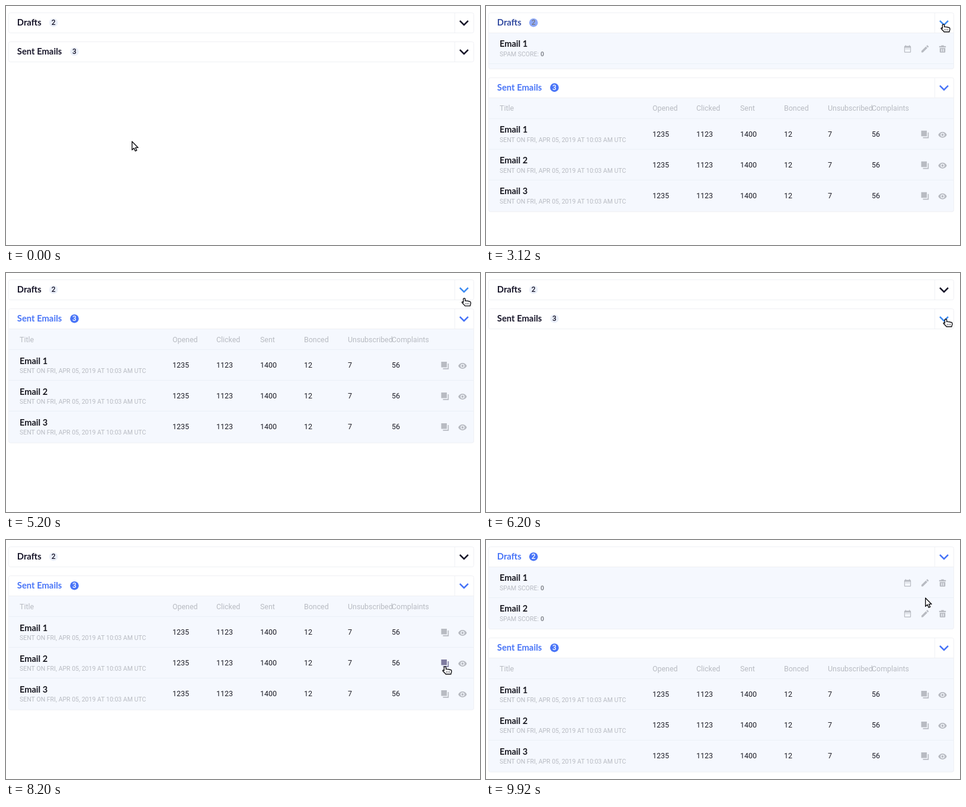
Recreate the animation shown at these times as an HTML page with a canvas. Size 800 by 404 pixels, loop 10000 ms.

```html
<!DOCTYPE html>
<html lang="en">
<head>
<meta charset="utf-8">
<title>Email lists</title>
<style>
html, body { margin: 0; width: 100%; height: 100%; overflow: hidden; background: #fff; }
canvas { display: block; width: 800px; height: 404px; }
</style>
</head>
<body>
<canvas id="stage"></canvas>
<script>
const W = 800, H = 404, LOOP = 10000, SLIDE = 520;
const canvas = document.getElementById('stage');
const ctx = canvas.getContext('2d');
const ratio = window.devicePixelRatio || 1;
canvas.width = W * ratio;
canvas.height = H * ratio;

const DARK = [24, 22, 42], BLUE = [72, 116, 247], HOVER = [62, 140, 242];
const PALE = [234, 239, 249], WHITE = [255, 255, 255];
const GREY = [184, 187, 194], PLUM = [70, 60, 125];
const LINE = '#eff0f4', ROW_LINE = '#ebf0f7', BODY = '#f5f8fe', MUTED = '#b8bbc2';
const HEAD = 'Lato, "Open Sans", sans-serif';
const TEXT = 'Roboto, "Open Sans", sans-serif';

// Times of change and the value reached; values hold in between.
const TRACKS = {
  drafts: [[2990, 1], [4390, 0], [8910, 1]],
  sent: [[910, 1], [5670, 0], [6710, 1]],
  draftsHover: [[2300, 1], [5380, 0], [8910, 1], [9500, 0]],
  sentHover: [[910, 1], [1620, 0], [5560, 1], [7330, 0]],
  copyHover: [[8060, 1], [8340, 0]]
};

const CURSOR = [
  [80, 212, 228], [330, 600, 130], [500, 780, 58], [570, 789, 50], [680, 776, 77],
  [1440, 776, 77], [1700, 774, 64], [1880, 772, 51], [1920, 772, 40], [2000, 772, 33], [2080, 772, 30],
  [4920, 772, 30], [5300, 774, 46], [5640, 776, 77],
  [7230, 776, 77], [7720, 770, 165], [8020, 746, 211], [8200, 741, 213], [8360, 743, 206], [8720, 773, 29],
  [9440, 773, 29], [9640, 758, 62], [9920, 741, 97]
];

const EYE = new Path2D('M12 4.5C7 4.5 2.73 7.61 1 12c1.73 4.39 6 7.5 11 7.5s9.27-3.11 11-7.5c-1.73-4.39-6-7.5-11-7.5zM12 17a5 5 0 1 1 0-10a5 5 0 0 1 0 10zM12 9a3 3 0 1 0 0 6a3 3 0 0 0 0-6z');
const PENCIL = new Path2D('M3 17.25V21h3.75L17.81 9.94l-3.75-3.75zM20.71 7.04a1 1 0 0 0 0-1.41l-2.34-2.34a1 1 0 0 0-1.41 0l-1.83 1.83 3.75 3.75z');
const CALENDAR = new Path2D('M19 4h-1V2h-2v2H8V2H6v2H5a2 2 0 0 0-2 2v14a2 2 0 0 0 2 2h14a2 2 0 0 0 2-2V6a2 2 0 0 0-2-2zM19 20H5V9h14zM7 11h2v2H7zM11 11h2v2h-2zM15 11h2v2h-2z');
const TRASH = new Path2D('M8.5 2.5h7v2H21V8H3V4.5h5.5zM4.5 9.5h15V20a2 2 0 0 1-2 2h-11a2 2 0 0 1-2-2zM8.5 12v7.5h2V12zM13.5 12v7.5h2V12z');
const ARROW = new Path2D('M.7 .9V15.3L4 12.3L6.2 17.1L8.7 16L6.5 11.4H11z');
const HAND = new Path2D('M-1.6 8.6V2.3Q-1.6 1 0 1T1.6 2.3V5.4Q3 4.8 4.6 5.6Q6.4 5.1 7.8 6.3Q10.8 6 10.9 8.4V10.2Q10.2 11.8 9.9 13.8H1Q.4 12.3-1.4 10.9L-3.6 8.6Q-4.4 7.3-3.1 6.9Q-2.3 6.8-1.6 7.8');

const clamp = v => Math.max(0, Math.min(1, v));
const easeOut = v => 1 - Math.pow(1 - clamp(v), 3);
const mix = (a, b, k) => a.map((v, i) => v + (b[i] - v) * k);
const rgb = c => `rgb(${c.map(Math.round).join(',')})`;

function track(name, t, length, ease) {
  let value = 0;
  for (const [start, goal] of TRACKS[name]) {
    if (t < start) break;
    value += (goal - value) * ease((t - start) / length);
  }
  return value;
}

function cursorAt(t) {
  let prev = CURSOR[0];
  for (const next of CURSOR) {
    if (t < next[0]) {
      const k = clamp((t - prev[0]) / (next[0] - prev[0] || 1));
      return [prev[1] + (next[1] - prev[1]) * k, prev[2] + (next[2] - prev[2]) * k];
    }
    prev = next;
  }
  return [prev[1], prev[2]];
}

function label(text, x, y, font, color, align = 'left') {
  ctx.font = font;
  ctx.fillStyle = color;
  ctx.textAlign = align;
  ctx.fillText(text, x, y);
}

function line(x1, y1, x2, y2, color) {
  ctx.strokeStyle = color;
  ctx.lineWidth = 1;
  ctx.beginPath();
  ctx.moveTo(x1, y1);
  ctx.lineTo(x2, y2);
  ctx.stroke();
}

function icon(path, cx, cy, scale) {
  ctx.save();
  ctx.translate(cx - 12 * scale, cy - 12 * scale);
  ctx.scale(scale, scale);
  ctx.fillStyle = rgb(GREY);
  ctx.fill(path, 'evenodd');
  ctx.restore();
}

function copyIcon(x, y, color) {
  ctx.fillStyle = color;
  ctx.fillRect(x - 6.5, y - 6.5, 9.5, 9.5);
  ctx.strokeStyle = color;
  ctx.lineWidth = 1.7;
  ctx.beginPath();
  ctx.moveTo(x + 5.4, y - 3.5);
  ctx.lineTo(x + 5.4, y + 5.4);
  ctx.lineTo(x - 3.5, y + 5.4);
  ctx.stroke();
}

function chevron(y, color) {
  ctx.strokeStyle = color;
  ctx.lineWidth = 2.5;
  ctx.beginPath();
  ctx.moveTo(766, y - 3.6);
  ctx.lineTo(773, y + 3.4);
  ctx.lineTo(780, y - 3.6);
  ctx.stroke();
}

function card(top, bodyHeight, open, hover, title, count, badgeX, drawBody) {
  const mid = top + 17;
  ctx.save();
  ctx.beginPath();
  ctx.roundRect(4.5, top, 785, 35 + bodyHeight, 3);
  ctx.clip();
  ctx.fillStyle = '#fff';
  ctx.fillRect(4, top, 786, 35);
  if (bodyHeight > 0.2) {
    ctx.fillStyle = BODY;
    ctx.fillRect(4, top + 34.5, 786, bodyHeight + 1);
    drawBody(top + 34);
    line(5, top + 34.5, 789, top + 34.5, LINE);
  }
  ctx.restore();

  ctx.strokeStyle = LINE;
  ctx.lineWidth = 1;
  ctx.beginPath();
  ctx.roundRect(4.5, top + 0.5, 785, 34 + bodyHeight, 3);
  ctx.stroke();
  line(757.5, top + 1, 757.5, top + 34, LINE);

  const ink = mix(DARK, BLUE, open);
  label(title, 18.8, mid + 5, `bold 14.8px ${HEAD}`, rgb(ink));
  ctx.fillStyle = rgb(mix(PALE, BLUE, open));
  ctx.beginPath();
  ctx.arc(badgeX, mid + 0.2, 7.3, 0, Math.PI * 2);
  ctx.fill();
  const digit = mix(DARK, WHITE, Math.pow(open, 1.6));
  label(count, badgeX, mid + 4.4, `500 12px ${TEXT}`, rgb(digit), 'center');
  chevron(mid + 0.6, rgb(mix(ink, HOVER, hover)));
}

function draftRows(y) {
  for (let i = 0; i < 2; i++) {
    const top = y + i * 52;
    label('Email ' + (i + 1), 23, top + 24, `bold 14.6px ${HEAD}`, '#17171f');
    label('SPAM SCORE: ', 23, top + 40, `10.5px ${TEXT}`, MUTED);
    label('0', 92, top + 40, `bold 10.5px ${TEXT}`, '#85888f');
    icon(CALENDAR, 711.5, top + 27.5, 0.63);
    icon(PENCIL, 741, top + 27.5, 0.68);
    icon(TRASH, 770.5, top + 27.5, 0.63);
    if (i < 1) line(5, top + 52.5, 789, top + 52.5, ROW_LINE);
  }
}

function sentRows(y, copyHover) {
  const heads = ['Opened', 'Clicked', 'Sent', 'Bonced', 'Unsubscribed', 'Complaints'];
  const values = ['1235', '1123', '1400', '12', '7', '56'];
  const font = `12.4px ${TEXT}`;
  label('Title', 23, y + 22.5, font, MUTED);
  heads.forEach((h, i) => label(h, 281 + i * 74, y + 22.5, font, MUTED));
  for (let r = 0; r < 3; r++) {
    const top = y + 35 + r * 52;
    line(5, top + 0.5, 789, top + 0.5, ROW_LINE);
    label('Email ' + (r + 1), 23, top + 24.5, `bold 14.6px ${HEAD}`, '#17171f');
    label('SENT ON FRI, APR 05, 2019 AT 10:03 AM UTC', 23, top + 40.3, `10.53px ${TEXT}`, MUTED);
    values.forEach((v, i) => label(v, 281 + i * 74, top + 31.4, font, '#1d1d26'));
    copyIcon(741, top + 27.5, rgb(mix(GREY, PLUM, r === 1 ? copyHover : 0)));
    icon(EYE, 770.5, top + 28, 0.66);
  }
}

function drawCursor(x, y, shift) {
  const overButton = x > 757 && x < 790 && ((y > 11 && y < 45) || (y > 60 + shift && y < 95 + shift));
  const overCopy = Math.abs(x - 741) < 9 && Math.abs(y - 209) < 9 && shift < 1;
  const shape = overButton || overCopy ? HAND : ARROW;
  ctx.save();
  ctx.translate(x, y);
  ctx.lineJoin = 'round';
  ctx.lineWidth = 1.4;
  ctx.fillStyle = '#fff';
  ctx.strokeStyle = '#101014';
  ctx.fill(shape);
  ctx.stroke(shape);
  if (shape === HAND) {
    for (const k of [2.5, 5, 7.5]) line(k, 8.8, k, 11.5, '#55555c');
  }
  ctx.restore();
}

function draw(t) {
  const drafts = track('drafts', t, SLIDE, easeOut);
  const sent = track('sent', t, SLIDE, easeOut);
  const fade = name => track(name, t, 280, clamp);
  const shift = 105 * drafts;
  ctx.setTransform(ratio, 0, 0, ratio, 0, 0);
  ctx.fillStyle = '#fff';
  ctx.fillRect(0, 0, W, H);
  card(11, shift, drafts, fade('draftsHover'), 'Drafts', '2', 80.2, draftRows);
  card(60 + shift, 192.5 * sent, sent, fade('sentHover'), 'Sent Emails', '3', 115.5,
    y => sentRows(y, fade('copyHover')));
  const [x, y] = cursorAt(t);
  drawCursor(x, y, shift);
}

const begin = performance.now();
function tick() {
  const t = (performance.now() - begin) % LOOP;
  draw(Math.floor(t / 40) * 40);
  requestAnimationFrame(tick);
}
tick();
</script>
</body>
</html>
```
